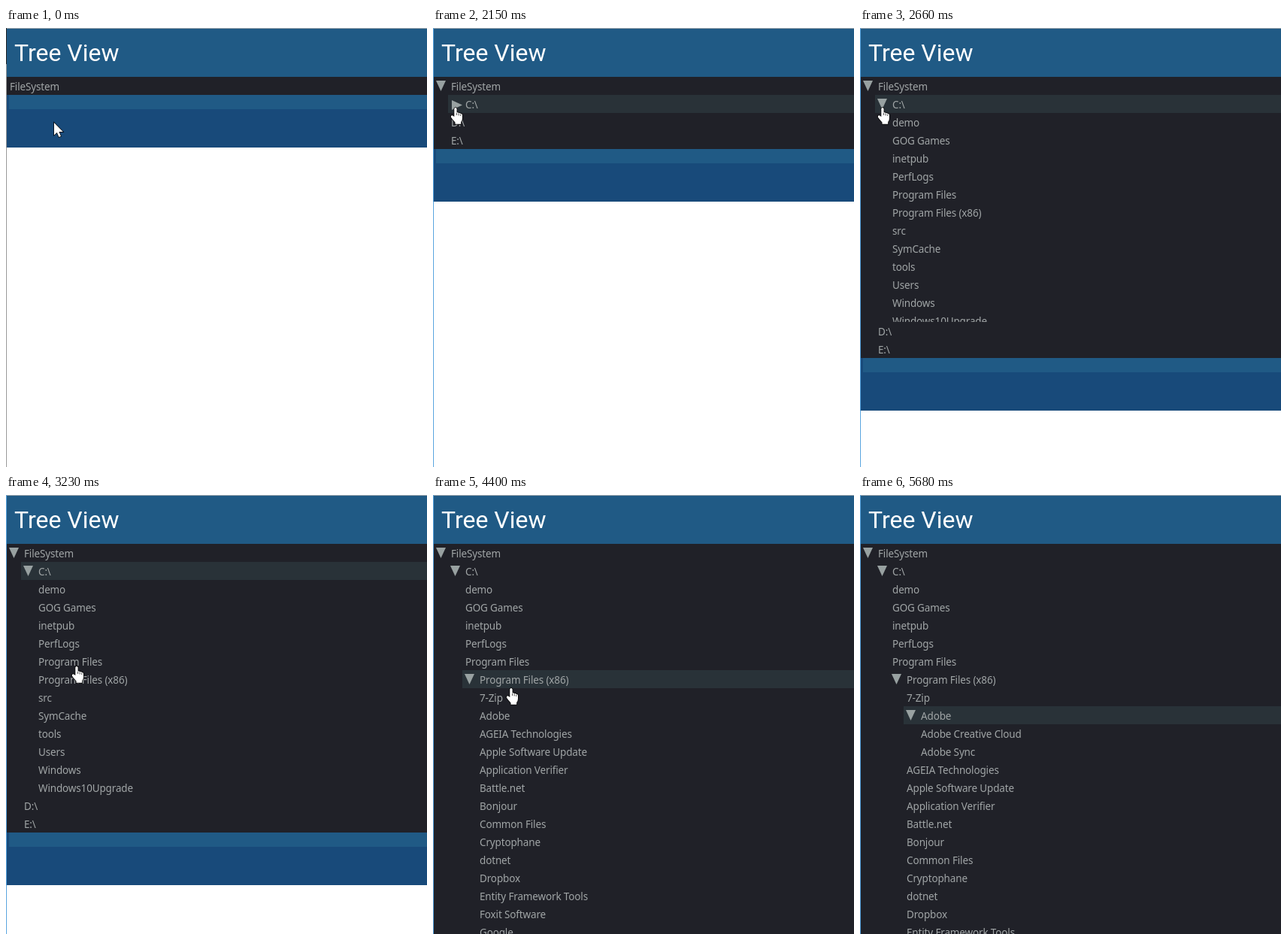
Recreate the animation shown at these times as an HTML page with a canvas. Size 560 by 584 pixels, loop 6110 ms.

```html
<!DOCTYPE html>
<html lang="en">
<head>
<meta charset="utf-8">
<title>Tree View</title>
<style>
  html, body { margin: 0; width: 100%; height: 100%; overflow: hidden; background: #fff; }
  canvas { display: block; }
</style>
</head>
<body>
<canvas id="stage" width="560" height="584"></canvas>
<script>
const W = 560, H = 584, LOOP = 6110;
const ROW = 24, INDENT = 19, TOP = 65;
const ctx = document.getElementById('stage').getContext('2d');

const leaves = names => names.split('|').map(name => ({ name }));
// hover: highlight and arrow appear; open: children start to slide out
const folder = (name, hover, open, kids, spare = 0) => ({ name, hover, open, kids, spare });

const adobe = folder('Adobe', 4950, 5270, leaves('Adobe Creative Cloud|Adobe Sync'));
const programs = folder('Program Files (x86)', 3780, 4088, [
  { name: '7-Zip' },
  adobe,
  ...leaves('AGEIA Technologies|Apple Software Update|Application Verifier|Battle.net|Bonjour|' +
    'Common Files|Cryptophane|dotnet|Dropbox|Entity Framework Tools|Foxit Software|Google')
], 10);
const drive = folder('C:\\', 2150, 2459, [
  ...leaves('demo|GOG Games|inetpub|PerfLogs|Program Files'),
  programs,
  ...leaves('src|SymCache|tools|Users|Windows|Windows10Upgrade')
]);
const root = folder('FileSystem', 740, 1085, [drive, ...leaves('D:\\|E:\\')]);
const folders = [root, drive, programs, adobe];

// Pointer hotspot: time, x, y
const track = [
  [0, 64, 126], [220, 32.5, 75], [1340, 32.5, 75], [1410, 20, 94], [1460, 25, 103],
  [1690, 25, 103], [1750, 28.5, 105], [2750, 28.5, 105], [3320, 105, 249],
  [4340, 105, 249], [4650, 95, 287], [4920, 95, 287], [5130, 549, 352],
  [5490, 528, 546], [5620, 528, 546], [5650, 528, 566], [5680, 528, 590]
];
const arrowShape = new Path2D('M0 0V16.5L3.8 13L6.4 19L9 17.9L6.5 12H11.8Z');
const handShape = new Path2D('M5.3 13V2.2Q6.9 -.2 8.6 2.2V7.6Q10.2 6.6 11.2 8.3' +
  'Q12.9 7.3 13.8 9.1Q15.9 8.7 16 10.8V15Q16 18 14.2 20V22.8H6.5V20.5' +
  'Q3.5 17.5 .8 13.6Q.5 11 2.8 11.2Z');
const handLines = new Path2D('M8.6 8V11M11.2 8.5V11.5M13.8 9.5V12');

const clamp = v => Math.min(1, Math.max(0, v));
const easeOut = v => 1 - (1 - clamp(v)) ** 3;

function rect(color, x, y, w, h) {
  ctx.fillStyle = color;
  ctx.fillRect(x, y, w, h);
}

function kidsHeight(node, t) {
  if (!node.kids || t < node.open) return 0;
  const full = node.kids.reduce((sum, kid) => sum + ROW + kidsHeight(kid, t), node.spare * ROW);
  return Math.round(full * easeOut((t - node.open) / 300));
}

function drawArrow(x, y, turn) {
  ctx.save();
  ctx.translate(x, y);
  ctx.rotate(turn * Math.PI / 2);
  ctx.fillStyle = '#98a1a1';
  ctx.beginPath();
  ctx.moveTo(-6.5, -4.5);
  ctx.lineTo(-6.5, 8.5);
  ctx.lineTo(7.5, 2);
  ctx.fill();
  ctx.restore();
}

// Draws a node with its children and returns the y below them
function drawNode(node, depth, y, t, hovered) {
  const left = depth * INDENT;
  const loaded = t >= node.hover;
  if (node === hovered) rect('#293238', left + 1, y, W, ROW);
  if (loaded) drawArrow(left + 12.5, y + 11.5, easeOut((t - node.open + 265) / 300));
  ctx.fillStyle = '#a0a5a6';
  ctx.fillText(node.name, left + (loaded ? 24 : 5), y + 18);
  y += ROW;

  const h = kidsHeight(node, t);
  if (h) {
    ctx.save();
    ctx.beginPath();
    ctx.rect(0, y, W, h);
    ctx.clip();
    node.kids.reduce((ky, kid) => drawNode(kid, depth + 1, ky, t, hovered), y);
    ctx.restore();
  }
  return y + h;
}

function drawPointer(t) {
  const i = track.findIndex(key => key[0] > t);
  if (i < 0) return;
  const [t0, x0, y0] = track[i - 1], [t1, x1, y1] = track[i];
  const p = (t - t0) / (t1 - t0);
  const hand = t >= 190;
  const shape = hand ? handShape : arrowShape;
  ctx.save();
  ctx.translate(Math.round(x0 + (x1 - x0) * p) - (hand ? 6 : 0), Math.round(y0 + (y1 - y0) * p));
  ctx.strokeStyle = '#000';
  ctx.lineWidth = 1.4;
  ctx.stroke(shape);
  ctx.fillStyle = '#fff';
  ctx.fill(shape);
  if (hand) {
    ctx.lineWidth = .7;
    ctx.stroke(handLines);
  }
  ctx.restore();
}

function draw(t) {
  rect('#fff', 0, 0, W, H);
  const bottom = TOP + ROW + kidsHeight(root, t);
  rect('#184a7a', 1, bottom, W, 70);
  rect('#205a85', 4, bottom, W, 19);
  rect('#205a85', 1, 1, W, TOP - 1);
  rect('#202128', 1, TOP, W, bottom - TOP);

  ctx.fillStyle = '#fff';
  ctx.font = '32px Roboto, sans-serif';
  ctx.letterSpacing = '0px';
  ctx.fillText('Tree View', 11, 44);

  ctx.font = '13.5px "Noto Sans", sans-serif';
  ctx.letterSpacing = '-0.15px';
  const hovered = folders.filter(f => t >= f.hover).pop();
  drawNode(root, 0, TOP, t, hovered);

  // window frame
  const focused = t >= 580;
  rect('#9aa5ad', 0, 0, W, 1);
  rect(focused ? '#5aa5e0' : '#9a9a9a', 0, 0, 1, H);
  if (!focused) rect('#2b2b2b', 0, 0, 1, 48);

  drawPointer(t);
}

const start = performance.now();
function tick() {
  draw((performance.now() - start) % LOOP);
  requestAnimationFrame(tick);
}
tick();
</script>
</body>
</html>
```
